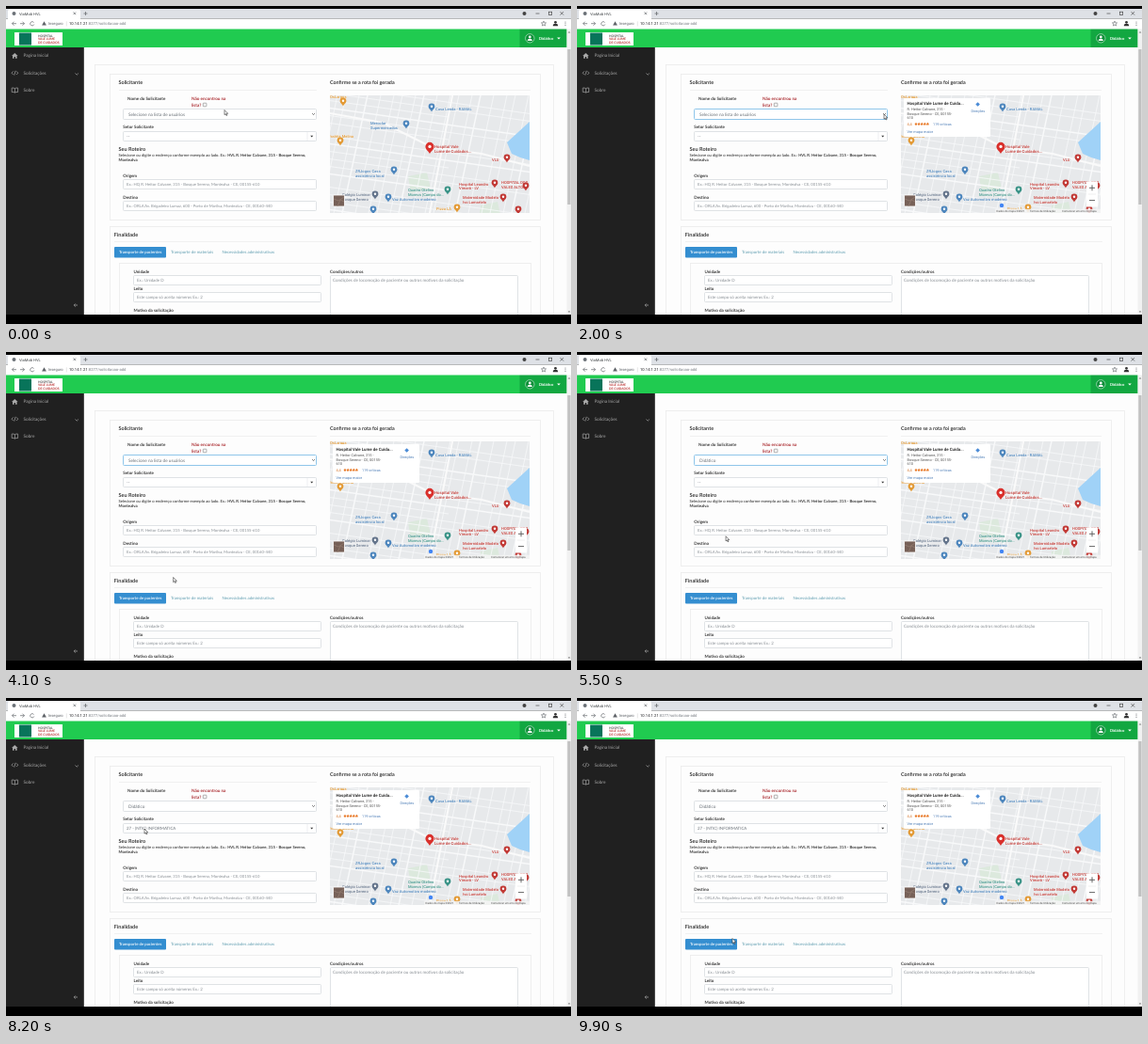
An HTML page for the animation above (10 s loop, 600 px wide and 338 px high).

```html
<!DOCTYPE html>
<html lang="pt">
<head>
<meta charset="utf-8">
<style>
html, body { margin: 0; width: 100%; height: 100%; overflow: hidden; background: #000 }
svg { display: block; width: 600px; height: 338px; font-family: Lato, sans-serif; text-rendering: geometricPrecision }
.ui, .map { font-family: Roboto, sans-serif }
text { white-space: pre }
</style>
</head>
<body>
<svg id="stage" viewBox="0 0 600 338"></svg>
<script>
const text = (x, y, size, str, fill = '#222', weight = 400, extra = '') =>
  `<text x="${x}" y="${y}" font-size="${size}" fill="${fill}" font-weight="${weight}" ${extra}>${str}</text>`;
const rect = (x, y, w, h, fill, extra = '') =>
  `<rect x="${x}" y="${y}" width="${w}" height="${h}" fill="${fill}" ${extra}/>`;
const line = (d, stroke, width = .7, extra = '') =>
  `<path d="${d}" fill="none" stroke="${stroke}" stroke-width="${width}" ${extra}/>`;
const shape = (d, fill) => `<path d="${d}" fill="${fill}"/>`;
const dot = (x, y, r, fill, extra = '') => `<circle cx="${x}" cy="${y}" r="${r}" fill="${fill}" ${extra}/>`;
const field = (x, y, w, h, extra = '') => rect(x, y, w, h, '#fff', `rx="1" stroke="#d3d7db" stroke-width=".7" ${extra}`);
const panel = (x, y, w, h) => rect(x, y, w, h, 'none', 'stroke="#ececec" stroke-width=".8"');
const caret = (x, y, s, fill) => shape(`M${x - s} ${y - s / 2}h${2 * s}l${-s} ${s * 1.1}z`, fill);
const pin = (x, y, fill, s = 1) => `<g transform="translate(${x} ${y}) scale(${s})">` +
  shape('M0 4.6C-.5 2.5-3.4 1.4-3.4-1.2A3.4 3.4 0 0 1 3.4-1.2C3.4 1.4 .5 2.5 0 4.6z', fill) + dot(0, -1.2, 1.2, '#fff') + '</g>';

function browser() {
  const icon = '#5f6368';
  return '<g class="ui">' +
    rect(0, 3, 600, 10.5, '#dee1e6') + shape('M2 14V5.5q0-2 2-2H77q2 0 2 2V14z', '#fff') +
    dot(8.5, 8, 2, '#6b7177') + text(14, 9.6, 4.1, 'ViaMob HVL', '#3c4043') +
    line('M71.5 6.5l2.6 2.6m0-2.6l-2.6 2.6M82.5 8h4m-2-2v4', icon) +
    dot(550.5, 8, 2, '#444') + line('M562.5 8h4M588.5 6l3.6 3.6m0-3.6l-3.6 3.6', '#333', .6) +
    rect(576.5, 6.2, 3.2, 3.2, 'none', 'stroke="#333" stroke-width=".6"') +
    rect(0, 13.5, 600, 11, '#fff') +
    line('M11 18.7H6.5m2-2l-2 2 2 2M15 18.7h4.5m-2-2l2 2-2 2M29.5 17.5a2.1 2.1 0 1 0 .3 2', icon) +
    shape('M40.5 16.2l2.4 4.4h-4.8z', icon) +
    text(44.8, 20.4, 4.1, 'Inseguro', icon) + line('M64.3 16.4v5', '#ccc', .5) +
    text(67, 20.4, 4.2, '10.14.1.21<tspan fill="#777c82">:8277/solicitacao-add</tspan>', '#202124') +
    line('M571 16l.7 1.8 1.9.1-1.5 1.2.5 1.9-1.6-1-1.6 1 .5-1.9-1.5-1.2 1.9-.1z', icon, .6) +
    dot(583.5, 17.3, 1.4, '#333') + shape('M580.8 21.2q0-2.4 2.7-2.4t2.7 2.4z', '#333') +
    [17, 18.7, 20.4].map(y => dot(594, y, .5, icon)).join('') + '</g>';
}

function frame() {
  const pale = '#a9a9a9';
  return rect(0, 24, 600, 304, '#fdfdfd') + rect(0, 24, 595.5, 20, '#20cb50') + rect(545.5, 24, 50, 20, '#12a741') +
    rect(9, 28, 51, 14, '#fff') + rect(14, 28.5, 13, 13, '#08745a') +
    ['HOSPITAL', 'VALE LUME', 'DE CUIDADOS'].map((s, i) => text(34, 32.5 + 3.7 * i, 3.3, s, i ? '#b33' : '#555', 700)).join('') +
    dot(556.3, 34.3, 4.7, '#0b8f38', 'stroke="#fff" stroke-width=".5"') + dot(556.3, 33, 1.4, '#fff') +
    shape('M553.7 37q0-2.2 2.6-2.2t2.6 2.2z', '#fff') +
    text(566, 36, 4.1, 'Didático', '#fff', 700) + caret(587, 34.5, 1.8, '#fff') +
    rect(0, 44, 82.8, 284, '#202020') +
    shape('M6 53l3.3-3 3.3 3h-1v2.7H10v-1.8H8.6v1.8H7V53z', pale) +
    line('M7.7 69.4L6 71.2l1.7 1.8m3.4-3.6l1.7 1.8-1.7 1.8M10.1 68.8l-1.3 4.8', pale) +
    line('M9.4 87.7q-1.5-1-3.2-.6v4.4q1.7-.4 3.2.6 1.5-1 3.2-.6v-4.4q-1.7-.4-3.2.6v4.4', pale) +
    text(18.5, 54.3, 4.7, 'Pagina Inicial', pale) + text(18.5, 72.7, 4.7, 'Solicitações', pale) + text(18.5, 91, 4.7, 'Sobre', pale) +
    line('M73.5 71.5l1.7 1.7 1.7-1.7M76 318h-3.8m1.6-1.6l-1.6 1.6 1.6 1.6', pale) +
    rect(595.5, 24, 4.5, 304, '#f1f1f1') + rect(596.3, 46, 3.2, 165, '#c1c1c1') +
    shape('M596.7 28.5h2.6l-1.3-1.6z', '#777') + caret(598, 325, 1.2, '#555');
}

function form() {
  const hint = '#868c92', label = (x, y, s) => text(x, y, 4.5, s, '#222', 600);
  return panel(94.5, 62.5, 487, 280) + panel(110.5, 72.5, 457, 155) + panel(110.5, 234.5, 457, 110) + panel(120.5, 273.5, 437, 70) +
    line('M120 89.5H330M344 89.5H557M115 250.5H558', '#ececec', .7) +
    text(119.5, 83, 5.5, 'Solicitante', '#222', 600) + text(344, 83, 5.4, 'Confirme se a rota foi gerada', '#222', 600) +
    label(129, 100, 'Nome do Solicitante') +
    text(197, 100, 4.6, 'Não encontrou na', '#a3181d', 600) + text(197, 107, 4.6, 'lista?', '#a3181d', 600) +
    rect(209.3, 103.2, 3.6, 3.6, '#fff', 'rx=".5" stroke="#777" stroke-width=".6"') +
    field(124.5, 109.5, 205, 11, 'id="select"') + text(130, 117.2, 4.7, '', '#666d74', 400, 'id="user"') +
    line('M325.2 114.2l1.3 1.3 1.3-1.3', '#333') +
    label(124.3, 130.3, 'Setor Solicitante') +
    field(124.5, 133.5, 205, 10) + line('M320 133.5v10', '#e2e5e8', .6) +
    text(128, 140.1, 4.4, '', '#666d74', 400, 'id="sector"') + caret(324.7, 138.6, 1.5, '#333') +
    text(119.5, 153.6, 5.6, 'Seu Roteiro', '#222', 600) +
    text(119.5, 160.2, 4.2, 'Selecione ou digite o endereço conforme exemplo ao lado. Ex.: <tspan font-weight="600">HVL R. Heitor Calvane, 315 - Bosque Sereno,</tspan>') +
    text(119.5, 165.2, 4.3, 'Montealva', '#222', 600) +
    label(124.3, 182, 'Origem') + field(124.5, 184.5, 205, 10) +
    text(128, 191, 4.2, 'Ex.: HQ R. Heitor Calvane, 315 - Bosque Sereno, Montealva - CE, 00155-610', hint) +
    label(124.3, 204.8, 'Destino') + field(124.5, 207.5, 205, 10) +
    text(128, 214, 4.2, 'Ex.: ORLA Av. Brigadeiro Lumaz, 600 - Porto de Marilva, Montealva - CE, 00160-440', hint) +
    text(114.8, 244.5, 5.6, 'Finalidade', '#222', 600) +
    rect(115, 256, 55, 11.5, '#348ed0', 'rx="1"') + text(120, 263.4, 4.3, 'Transporte de pacientes', '#fff', 600) +
    text(175, 263.4, 4.4, 'Transporte de materiais', '#5f9db0') + text(229.5, 263.4, 4.35, 'Necessidades administrativas', '#5f9db0') +
    label(135.5, 284, 'Unidade') + field(135.5, 286.5, 199, 10) + text(139, 293, 4.4, 'Ex.: Unidade D', hint) +
    label(135.5, 302, 'Leito') + field(135.5, 304.5, 199, 10) + text(139, 311, 4.4, 'Este campo só aceita números Ex.: 2', hint) +
    label(135.5, 325, 'Motivo da solicitação') +
    label(344, 284, 'Condições/outros') + field(344.5, 286.5, 199, 50) +
    text(347, 293, 4.55, 'Condições de locomoção de paciente ou outros motivos da solicitação', hint);
}

function map() {
  const blue = '#4d86bd', red = '#c23a36', teal = '#3a9387', orange = '#e39a35';
  let roads = '';
  for (let i = 0; i < 24; i++) {
    const x = 325 + i * 12 + (i * 7) % 5, y = 70 + i * 9 + (i * 5) % 6;
    roads += line(`M${x} 90L${x - 29} 225`, '#f8f9fa', i % 5 ? .8 : 1.5) +
      line(`M340 ${y}L${i % 3 ? 560 : 470} ${y + (i % 3 ? 31 : 18)}`, '#f8f9fa', i % 4 ? .8 : 1.5);
  }
  const places = [
    [452, 108, blue, 456, 110.5, ['Casa Lenda - RAMAL']], [425, 126, blue, 387, 126, ['Mercolar', 'Supermercados']],
    [412, 175, blue, 371, 177, ['ZRJogos Casa', 'assistência local']], [392, 201, '#64748b', 357, 202, ['Colégio Luminar', 'Bosque Sereno']],
    [469, 196, teal, 427, 197, ['Quadra Otelino', 'Moreva (Campo do...']], [406, 204, blue, 410, 207, ['Vaz Automotivo moderno']],
    [532, 162, red, 516, 164.5, ['VLU']], [519, 189, red, 481, 190.5, ['Hospital Leandro', 'Vimarã - LV']],
    [552, 192, red, 526, 188.8, ['HOSPITAL DOS', 'VALES ALTOS']], [528, 204, red, 485, 205, ['Maternidade Modelo', 'Ivo Lamartelo']],
    [358, 102, orange, 344, 97.5, ['OsLargos']], [355, 144, orange, 342, 140, ['Pastéis Melina']],
    [479, 215, orange, 457, 217, ['Pizza LÁ']], [390, 217, blue, 0, 0, []], [544, 217, red, 0, 0, []]
  ];
  const stars = [0, 1, 2, 3, 4].map(i => shape(`M${360 + i * 3.1} 123.6l.5 1.2 1.2.1-.9.8.3 1.3-1.1-.7-1.1.7.3-1.3-.9-.8 1.2-.1z`, '#e7711b')).join('');
  return `<clipPath id="view">${rect(344, 95, 212, 125, '#fff')}</clipPath><g class="map" clip-path="url(#view)">` +
    rect(344, 95, 212, 125, '#e7e9eb') + shape('M427 181l20-4 4 17-21 5zM504 212l18-4 3 13h-22z', '#dce9dd') + roads +
    line('M344 114L400 124 452 150 505 157 556 170M475 90L449 225', '#fafafa', 2) +
    shape('M556 123L532 145 537 157 546 161 556 164z', '#a0d2f7') +
    '<g stroke="#f4f4f4" stroke-width=".6" paint-order="stroke">' + places.map(([, , fill, x, y, rows]) =>
      rows.map((s, i) => text(x, y + i * 4.8, 4.1, s, fill, 500)).join('')).join('') +
    text(455, 151.2, 4.3, 'Hospital Vale', red, 500) + text(455, 156, 4.3, 'Lume de Cuidados...', red, 500) + '</g>' +
    places.map(([x, y, fill]) => pin(x, y, fill)).join('') + pin(450, 151, '#d9302c', 1.35) +
    rect(347.5, 201, 12, 12, '#776158', 'rx="1" stroke="#fff" stroke-width=".8"') +
    line('M348 205l5 2 6-4M352 213l3-7 4 2', '#927b70', .8) +
    '<g id="overlay">' + rect(347, 98, 92, 41, '#fff', 'rx="1"') +
    text(350.5, 105.2, 4.4, 'Hospital Vale Lume de Cuida...', '#111', 500) +
    ['R. Heitor Calvane, 315 -', 'Bosque Sereno - CE, 00155-', '610'].map((s, i) => text(350.5, 111.3 + i * 4.4, 3.9, s, '#555')).join('') +
    text(350.5, 127, 3.9, '4,4', '#d26a1c') + stars + text(378, 127, 3.8, '119 críticas', '#4a7bb5') +
    text(350.5, 134.6, 3.9, 'Ver mapa maior', '#4a7bb5') +
    rect(424, 103, 3.2, 3.2, '#4a8bd6', 'transform="rotate(45 425.6 104.6)"') + text(418.5, 113, 3.8, 'Direções', '#4a7bb5') +
    rect(541, 186.5, 12, 27, '#fff', 'rx="1"') + line('M544 193.3h6m-3-3v6M544 206.6h6', '#555', .9) + line('M543 200h8', '#ddd', .5) +
    dot(451, 212, 2.2, '#4285f4') + rect(444, 215.8, 112, 4.2, '#f5f5f5', 'opacity=".85"') +
    text(445.5, 219, 2.9, 'Dados do mapa ©2021', '#444') + text(481, 219, 2.9, 'Termos de Utilização', '#444') +
    text(515, 219, 2.9, 'Comunicar um erro no mapa', '#444') + '</g></g>';
}

const $ = id => document.getElementById(id);
$('stage').innerHTML = frame() + form() + map() + browser() + rect(0, 0, 600, 3, '#000') + rect(0, 328, 600, 10, '#000') +
  '<path id="cursor" d="M0 0V5.2L1.2 4.1 2 6 2.9 5.6 2.1 3.8H3.7z" fill="#fff" stroke="#222" stroke-width=".55"/>';

// Pointer rests: time, x, y
const path = [[0, 232, 110.5], [800, 326, 115], [2100, 326, 115], [2900, 331, 239], [3100, 331, 239], [4200, 174, 239.5],
  [4800, 162.5, 218.5], [4900, 162.5, 218.5], [6600, 147, 139], [8900, 147, 139], [9900, 165, 255.5], [10000, 165, 255.5]];

function draw(now) {
  const t = Math.floor(now % 10000 / 100) * 100;
  const i = path.findIndex(p => p[0] > t), [t0, x0, y0] = path[i - 1], [t1, x1, y1] = path[i];
  const u = (t - t0) / (t1 - t0), e = u * u * (3 - 2 * u);
  $('cursor').setAttribute('transform', `translate(${x0 + (x1 - x0) * e} ${y0 + (y1 - y0) * e})`);
  const focused = t >= 1200 && t < 6400;
  $('select').setAttribute('stroke', focused ? '#8fc6ea' : '#d3d7db');
  $('select').setAttribute('stroke-width', focused ? 1 : .7);
  $('user').textContent = t < 5000 ? 'Selecione na lista de usuários' : 'Didático';
  $('sector').textContent = t < 8200 ? '--' : '27 - (NTIC) INFORMATICA';
  $('overlay').style.display = t < 200 ? 'none' : '';
  requestAnimationFrame(draw);
}
requestAnimationFrame(draw);
</script>
</body>
</html>
```
